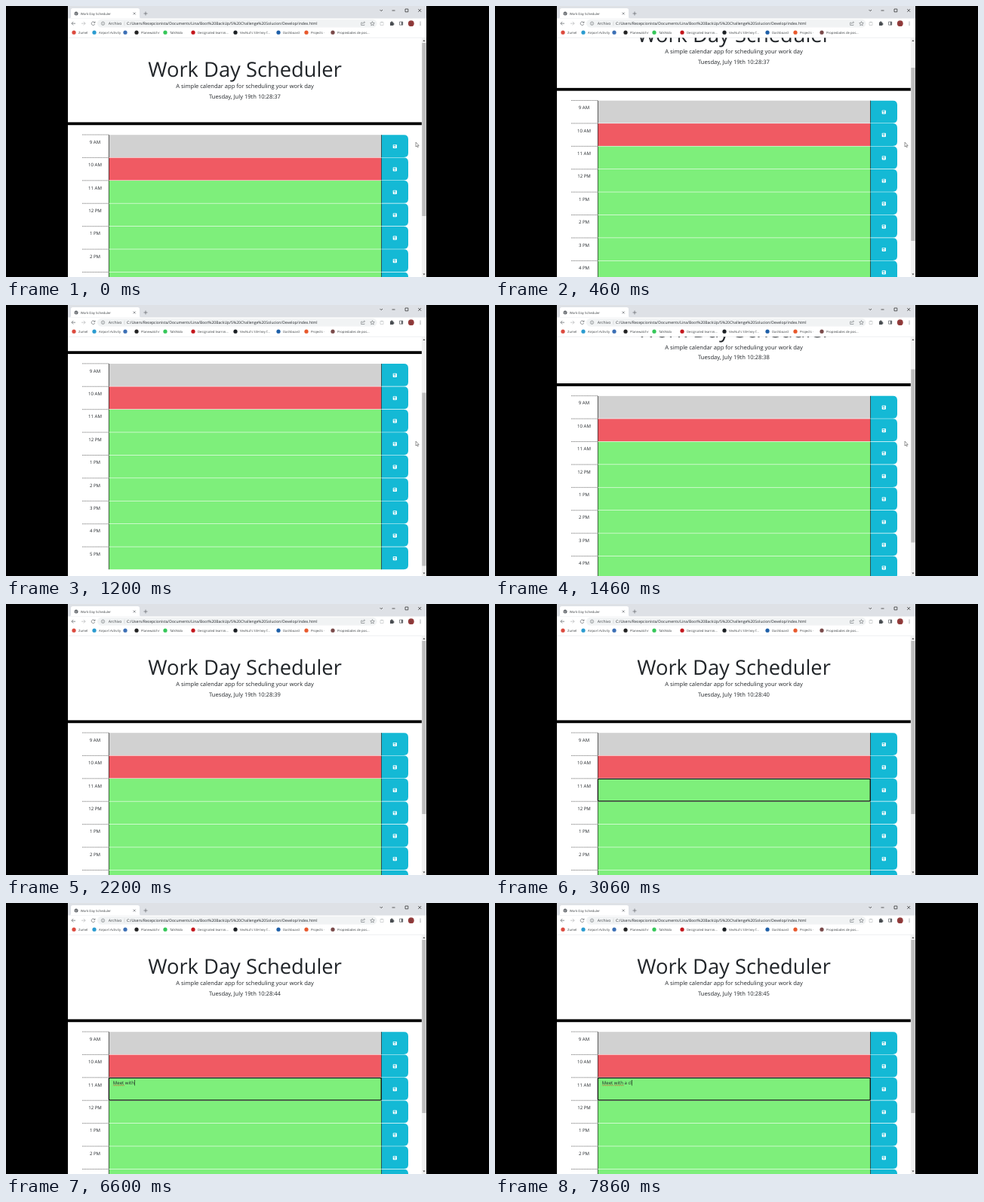
These frames come from a looping animation (640 px wide and 360 px high, 8000 ms). An HTML page:

```html
<!DOCTYPE html>
<html lang="en">
<head>
<meta charset="utf-8">
<title>Work Day Scheduler</title>
<style>
html, body { margin: 0; width: 100%; height: 100%; overflow: hidden; background: #000; }
svg { display: block; width: 640px; height: 360px; }
text { font-family: "Open Sans", "Noto Sans", sans-serif; text-rendering: geometricPrecision; white-space: pre; fill: #212529; }
.mid { text-anchor: middle; }
.ui { font-size: 4.25px; fill: #3c4043; }
.line { fill: none; stroke: #5f6368; stroke-width: .7; }
</style>
</head>
<body>
<svg id="stage" viewBox="0 0 640 360"></svg>
<script>
const LOOP = 8000, ROW = 30.42, TOP = 171, SCROLL = 102;
const START_SECOND = 37, FIRST_TICK = 590;
const FOCUS = 2530;
const KEYS = [[3660, 'M'], [3930, 'e'], [4130, 'e'], [4400, 't'], [4660, ' '], [5400, 'w'], [6130, 'i'],
  [6200, 't'], [6590, 'h'], [6730, ' '], [7060, 'a'], [7260, ' '], [7660, 'c'], [7860, 'l']];
// misspelling marks: time, first letter, letter count
const MARKS = [[4800, 0, 4], [6800, 5, 4]];

const rect = (x, y, w, h, fill, extra = '') => `<rect x="${x}" y="${y}" width="${w}" height="${h}" fill="${fill}" ${extra}/>`;
const dot = (x, y, r, fill) => `<circle cx="${x}" cy="${y}" r="${r}" fill="${fill}"/>`;
const line = (d, extra = '') => `<path class="line" d="${d}" ${extra}/>`;
const text = (x, y, s, cls = '', size = '', extra = '') =>
  `<text x="${x}" y="${y}" class="${cls}" ${size && `style="font-size:${size}px"`} ${extra}>${s}</text>`;

function bookmarks() {
  return [
    [90, '#dc4a3e', 'Zumel'], [117, '#2a9bd0', 'Airport Activity'], [158, '#3b6fb5', ''],
    [173, '#222', 'Planewatchr'], [211, '#35c759', 'TalkNido'], [248, '#c4161c', 'Designated learnin...'],
    [304, '#1b1f23', "VexNut's SSH key f..."], [361, '#1d5fa8', 'Dashboard'],
    [398, '#e8582c', 'Projects ·'], [433, '#7a4a4a', 'Propiedades de pos...']
  ].map(([x, color, label]) => dot(x, 35.2, 2.6, color) + text(x + 6, 36.8, label, 'ui')).join('');
}

function browser() {
  return rect(82, 0, 475, 360, '#fff') + rect(82, 0, 475, 16.5, '#dee1e6') +
    '<path d="M84 16.5q2 0 2-2v-9q0-2.5 2.500-2.500h86q2.500 0 2.500 2.500v9q0 2 2 2z" fill="#fff"/>' +
    dot(93, 10, 2.5, '#5f6368') + line('M91 9.500l2 .8 1.700-1.500M92 11.500l1.500-.5', 'style="stroke:#fff;stroke-width:.5"') +
    text(98.700, 11.5, 'Work Day Scheduler', 'ui', 4.3) +
    line('M168.700 8.500l3 3m0-3l-3 3M182.500 10h5M185 7.500v5') +
    line('M495.500 5l1.700 1.700L499 5M511.500 6h4M529 4h3.800v3.800H529zM546.300 4l3.800 3.800m0-3.800l-3.800 3.800', 'style="stroke:#222"') +
    rect(121, 17.8, 370.5, 10.8, '#f1f3f4', 'rx="5.4"') +
    line('M92 23.200h-5m2.200-2.300L86.900 23.200l2.300 2.300') +
    line('M100 23.200h5m-2.200-2.300l2.300 2.300-2.300 2.300', 'opacity=".45"') +
    line('M117.500 22a2.300 2.300 0 1 0 .2 2M118 20.600v1.700h-1.700') +
    line('M130.700 23.200a2.200 2.200 0 1 0-4.400 0a2.200 2.200 0 1 0 4.400 0M128.500 22.800v1.600M128.500 21.500v.6', 'style="stroke-width:.55"') +
    text(135.800, 25, 'Archivo', 'ui', 5.08) + rect(156.8, 20.5, .4, 5.4, '#bbb') +
    text(160, 25, 'C:/Users/Recepcionista/Documents/Lina/Boot%20BackUp/5%20Challenge%20Solucion/Develop/index.html', '', 5.08) +
    line('M472.500 22h-1.800v3.500h4.200v-1M472.300 24q.3-2 3-2.300m-1-1.200l1.200 1.200-1.200 1.200', 'style="stroke-width:.55"') +
    line('M485.500 20.600l.8 1.800 2 .2-1.500 1.300.4 2-1.700-1-1.700 1 .4-2-1.500-1.300 2-.2z', 'style="stroke-width:.55"') +
    line('M496 21.500h4v4h-4zM498 20.500v2', 'opacity=".35"') +
    '<path d="M509 21.500h1.300q0-1.200.9-1.200t.9 1.200h1.300v1.500q1.100 0 1.100.9t-1.100.9v1.200H509z" fill="#4a4e52"/>' +
    line('M521.500 21h4.200v4.200h-4.200z') + rect(523.8, 21, 2, 4.2, '#5f6368') +
    dot(536.8, 23.2, 3.9, '#923b3b') + text(536.8, 24.800, 'L', 'mid', 4, 'fill="#fff" opacity=".7"') +
    [21.3, 23.2, 25.1].map(y => dot(549, y, .55, '#5f6368')).join('') +
    bookmarks() + rect(82, 41.8, 475, .5, '#dadce0');
}

function row(i) {
  const y = TOP + i * ROW, hour = 9 + i;
  const label = (hour > 12 ? hour - 12 : hour) + (hour < 12 ? ' AM' : ' PM');
  const color = ['#d1d1d1', '#f05a63'][i] || '#7eef7b';
  const h = ROW - .6;
  return line(`M101 ${y}H136`, 'stroke-dasharray="1.2 .7" style="stroke:#333;stroke-width:.6"') +
    text(118, y + 11.7, label, 'mid', 6.07) +
    rect(136, y + .2, 361.5, h, color) + rect(135.9, y + .2, .7, h, '#222') +
    `<path d="M497.300 ${y + .2}h30q5.700 0 5.700 5.700v${h - 11.4}q0 5.700-5.700 5.700h-30z" fill="#14b9d5"/>` +
    rect(497, y + .2, .7, h, '#222') +
    rect(512.700, y + 12.9, 5.2, 5.2, '#fff', 'rx=".8"') +
    rect(513.600, y + 13.7, 2.8, 1.3, '#14b9d5') + dot(515.3, y + 16.5, .8, '#14b9d5');
}

const stage = document.getElementById('stage');
stage.innerHTML = browser() +
  '<clipPath id="view"><rect x="82" y="42.300" width="469" height="317.700"/></clipPath>' +
  '<g clip-path="url(#view)"><g id="page">' +
  text(316.500, 93.8, 'Work Day Scheduler', 'mid', 27.3) +
  text(316.500, 109, 'A simple calendar app for scheduling your work day', 'mid', 7.58) +
  text(316.500, 122.6, '', 'mid', 7.58, 'id="clock"') +
  rect(82, 154.4, 469, 3.8, '#000') +
  Array.from({ length: 9 }, (_, i) => row(i)).join('') +
  '<g id="field">' + rect(136.4, TOP + 2 * ROW + .5, 360.800, 29.5, 'none', 'rx="1" stroke="#101010" stroke-width="1.2"') +
  text(141.800, 241.1, '', '', 6.07, 'id="entry"') +
  MARKS.map(() => '<path class="mark" fill="none" stroke="#e0301e" stroke-width=".55"/>').join('') +
  rect(0, 235, .6, 7.6, '#111', 'id="caret"') + '</g></g></g>' +
  rect(550.8, 42.3, 6.2, 317.7, '#f1f1f1') +
  '<path d="M552.300 47l1.600-2 1.600 2zM552.300 355.500l1.600 2 1.600-2z" fill="#555"/>' +
  rect(551.3, 49, 5.3, 230, '#bdbdbd', 'id="thumb"') +
  '<path id="pointer" d="M0 0v6l1.400-1.200 1 2 .9-.4-.9-2h1.800z" fill="#fff" stroke="#333" stroke-width=".5"/>';

const [page, clock, field, entry, caret, thumb, pointer] =
  ['page', 'clock', 'field', 'entry', 'caret', 'thumb', 'pointer'].map(id => document.getElementById(id));
const marks = document.querySelectorAll('.mark');
const show = (el, on) => el.setAttribute('visibility', on ? 'inherit' : 'hidden');

function ease(t, from, to) {
  const u = Math.min(1, Math.max(0, (t - from) / (to - from)));
  return u * u * (3 - 2 * u);
}

function wave(x, width) {
  let d = `M${x} 242.600`;
  for (let i = 0; i * .8 < width; i++) d += `l.8 ${i % 2 ? .7 : -.7}`;
  return d;
}

function draw(now) {
  const t = now % LOOP;
  const scroll = SCROLL * (ease(t, 215, 745) - ease(t, 1055, 1860));
  page.setAttribute('transform', `translate(0 ${-scroll})`);
  thumb.setAttribute('y', 49 + scroll * .725);
  clock.textContent = 'Tuesday, July 19th 10:28:' + (START_SECOND + Math.floor((t - FIRST_TICK) / 1000) + 1);

  pointer.setAttribute('transform', `translate(${543 - 40 * ease(t, 1660, 1860)} 181)`);
  show(pointer, t < 1830);

  const typed = KEYS.filter(k => k[0] <= t);
  const last = typed.length ? typed[typed.length - 1][0] : FOCUS;
  const value = typed.map(k => k[1]).join('');
  if (entry.textContent !== value) entry.textContent = value;
  const span = (from, n) => n ? entry.getSubStringLength(from, n) : 0;
  show(field, t >= FOCUS);
  caret.setAttribute('x', 141.9 + span(0, value.length));
  show(caret, t >= FOCUS && (t - last) % 1060 < 530);
  MARKS.forEach(([time, from, n], i) =>
    marks[i].setAttribute('d', t < time ? '' : wave(141.8 + span(0, from), span(from, n))));
  requestAnimationFrame(draw);
}
draw(0);
</script>
</body>
</html>
```
